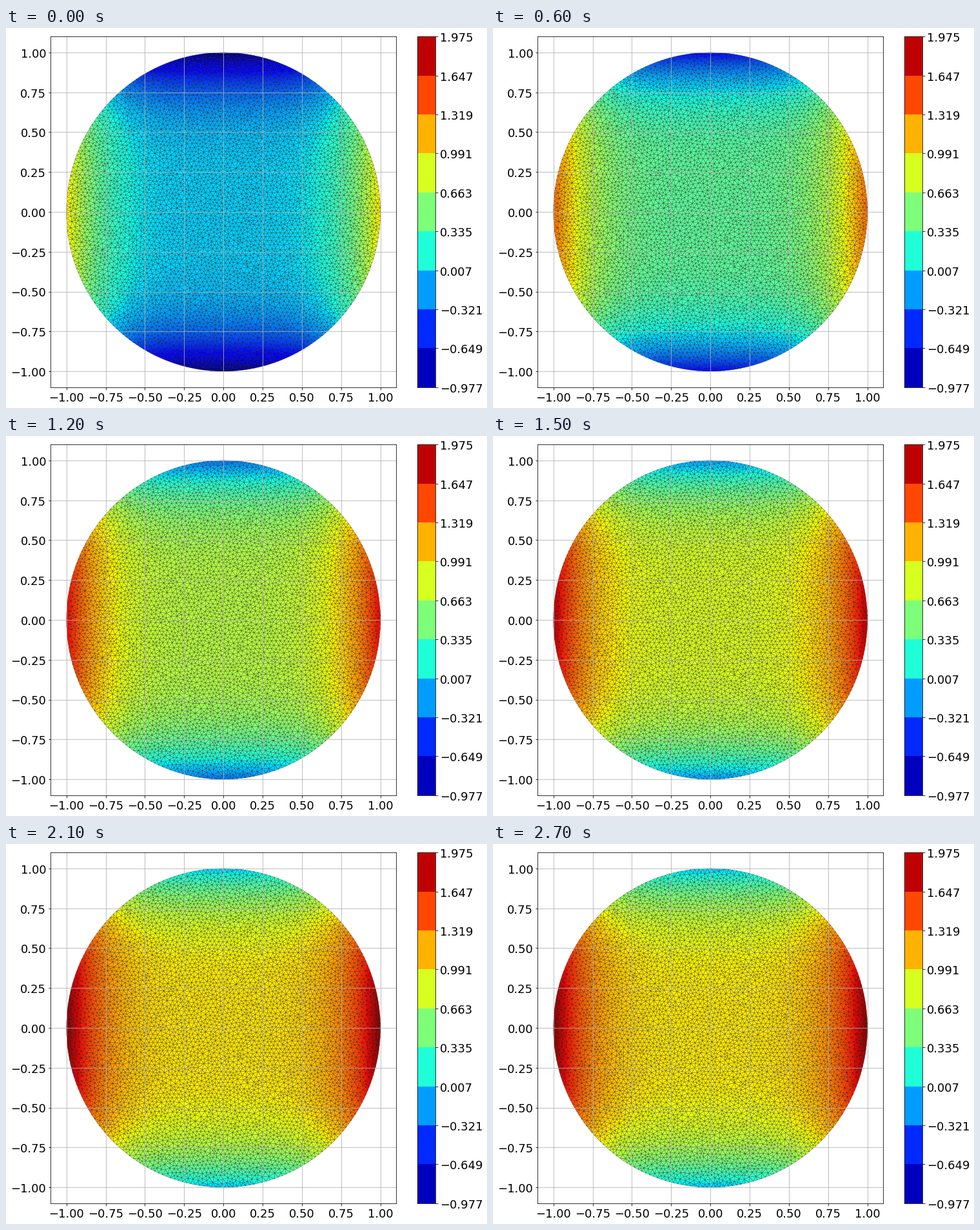
These frames come from a looping animation (746x589 px, 3000 ms). A matplotlib script:

```python
import numpy as np
import matplotlib.pyplot as plt
from matplotlib.animation import FuncAnimation
from matplotlib.transforms import ScaledTranslation
from matplotlib.tri import Triangulation

WIDTH, HEIGHT, DPI = 746, 589, 72
FRAMES, INTERVAL, TIME_STEP = 10, 300, 0.2
V_MIN, V_MAX, BANDS = -0.977, 1.975, 9
SPACING = 0.027
LABEL_DROP = 0.93  # pixels

plt.rcParams.update({"font.family": "DejaVu Sans", "font.size": 18})


def disc_mesh(h, seed=4):
    """Irregular triangulation of the unit disc with edges of about h."""
    rng = np.random.default_rng(seed)
    angle = np.linspace(0, 2 * np.pi, round(2 * np.pi / h), endpoint=False)
    rim = np.column_stack([np.cos(angle), np.sin(angle)])

    rows = np.arange(-1, 1, h * np.sqrt(3) / 2)
    x, y = np.meshgrid(np.arange(-1, 1 + h, h), rows)
    x[1::2] += h / 2
    inner = np.column_stack([x.ravel(), y.ravel()])
    inner += rng.uniform(-0.48 * h, 0.48 * h, inner.shape)
    inner = inner[np.hypot(*inner.T) < 1 - 0.6 * h]

    points = np.vstack([rim, inner])
    for _ in range(2):
        edges = Triangulation(*points.T).edges
        both = np.vstack([edges, edges[:, ::-1]])
        total = np.zeros_like(points)
        np.add.at(total, both[:, 0], points[both[:, 1]])
        count = np.bincount(both[:, 0], minlength=len(points))
        points[len(rim):] = (total / count[:, None])[len(rim):]
    return Triangulation(*points.T)


def pixel_axes(left, top, width, height):
    return fig.add_axes([left / WIDTH, 1 - (top + height) / HEIGHT,
                         width / WIDTH, height / HEIGHT])


def lower_labels(axes):
    shift = ScaledTranslation(0, -LABEL_DROP / DPI, fig.dpi_scale_trans)
    for label in axes.get_xticklabels() + axes.get_yticklabels():
        label.set_transform(label.get_transform() + shift)


fig = plt.figure(figsize=(WIDTH / DPI, HEIGHT / DPI), dpi=DPI, facecolor="white")
ax = pixel_axes(69.31, 13.2, 535.68, 543.6)
bar = pixel_axes(638.47, 13.2, 27.18, 543.6)

mesh = disc_mesh(SPACING)
shape = (mesh.x**4 - mesh.y**4)[mesh.triangles].mean(axis=1)
surface = ax.tripcolor(mesh, facecolors=shape, cmap="jet", vmin=V_MIN, vmax=V_MAX,
                       edgecolors="k", linewidth=0.25)
ticks = np.linspace(-1, 1, 9)
ax.set(xlim=(-1.1, 1.1), ylim=(-1.1, 1.1), xticks=ticks, yticks=ticks)
ax.grid(True)

levels = np.linspace(V_MIN, V_MAX, BANDS + 1)
bar.pcolormesh([0, 1], levels, (np.arange(BANDS)[:, None] + 0.5) / BANDS,
               cmap="jet", vmin=0, vmax=1)
bar.set(xlim=(0, 1), ylim=(V_MIN, V_MAX), xticks=[])
bar.yaxis.tick_right()
bar.set_yticks(levels, [f"{v:.3f}".replace("-", "\u2212") for v in levels])

lower_labels(ax)
lower_labels(bar)


def update(frame):
    surface.set_array(shape + np.sin(TIME_STEP * frame))
    return [surface]


animation = FuncAnimation(fig, update, frames=FRAMES, interval=INTERVAL,
                          repeat=True, repeat_delay=0)
plt.show()
```
